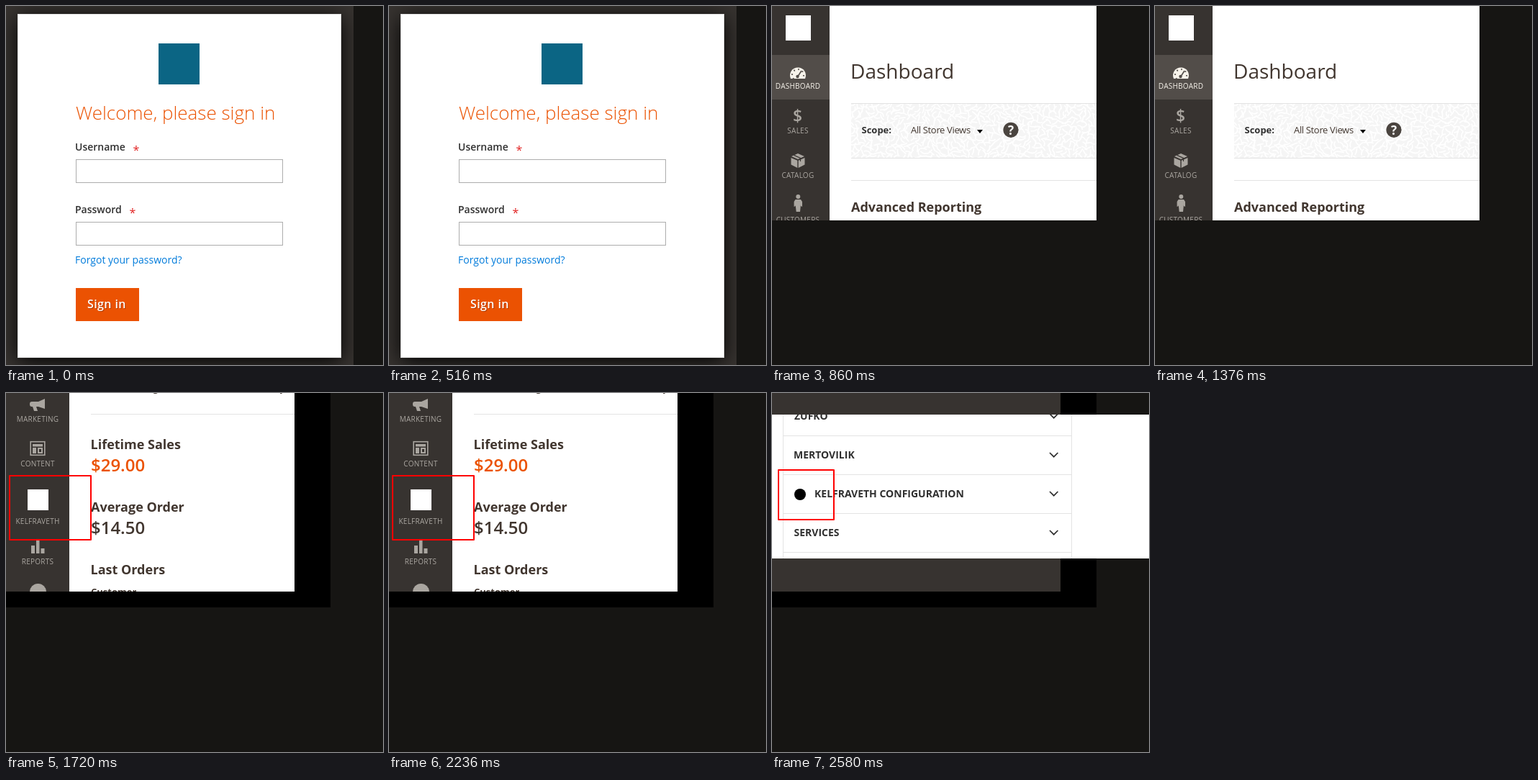
Write an HTML page that moves like this. It is 524 px wide and 499 px high and loops after 3.44 s.

```html
<!DOCTYPE html>
<html lang="en">
<head>
<meta charset="utf-8">
<title>Store admin tour</title>
<style>
  html, body { margin: 0; width: 100%; height: 100%; overflow: hidden; background: #161513; }
  svg { display: block; width: 524px; height: 499px; font-family: "Open Sans", sans-serif; }
  .scene { opacity: 0; animation: show 3440ms step-end infinite; }
  @keyframes show {
    0% { opacity: 1; }
    25%, 100% { opacity: 0; }
  }
  .b { font-weight: 700; }
  .sb { font-weight: 600; }
  .menu { font-size: 10px; letter-spacing: .025em; text-anchor: middle; fill: #aaa6a0; }
  .icon { fill: #aaa6a0; }
  .rule { fill: #e3e3e3; }
  .mark { fill: none; stroke: #f00; stroke-width: 2; stroke-linejoin: round; }
  .input { fill: #fff; stroke: #adadad; }
  .star { font-size: 16px; fill: #e22626; }
  .arrow { fill: none; stroke: #303030; stroke-width: 1.7; }
</style>
</head>
<body>
<svg viewBox="0 0 524 499">
  <defs>
    <clipPath id="c0"><rect width="483" height="499"/></clipPath>
    <clipPath id="c1"><rect width="451" height="298"/></clipPath>
    <clipPath id="c2"><rect width="401" height="276"/></clipPath>
    <clipPath id="c3"><rect y="30" width="524" height="200"/></clipPath>
    <clipPath id="band"><rect x="110" y="136" width="341" height="75"/></clipPath>
    <filter id="shadow" x="-20%" y="-20%" width="140%" height="140%">
      <feDropShadow dx="0" dy="5" stdDeviation="15" flood-color="#000"/>
    </filter>
  </defs>
  <rect width="524" height="499" fill="#161513"/>

  <!-- Sign in -->
  <g class="scene" clip-path="url(#c0)">
    <rect width="483" height="499" fill="#373330"/>
    <rect x="16" y="11" width="450" height="478" fill="#fff" filter="url(#shadow)"/>
    <rect x="16.5" y="11.5" width="449" height="477" fill="#fff" stroke="#e3e3e3"/>
    <rect x="212" y="52" width="57" height="57" fill="#0b6584"/>
    <text x="97" y="158" font-size="26" font-weight="300" fill="#eb5202">Welcome, please sign in</text>
    <g class="sb" font-size="14" fill="#303030">
      <text x="96" y="201">Username</text>
      <text x="96" y="288">Password</text>
    </g>
    <text class="star" x="176.5" y="206">*</text>
    <text class="star" x="171.5" y="293">*</text>
    <rect class="input" x="97.5" y="213.5" width="287" height="32"/>
    <rect class="input" x="97.5" y="300.5" width="287" height="32"/>
    <text x="96" y="358" font-size="14" fill="#007bdb">Forgot your password?</text>
    <rect x="97" y="392" width="88" height="46" fill="#eb5202"/>
    <text class="sb" x="113" y="420" font-size="16" letter-spacing=".4" fill="#fff" style="text-shadow:1px 1px 0 rgba(0,0,0,.25)">Sign in</text>
  </g>

  <!-- Dashboard -->
  <g class="scene" clip-path="url(#c1)">
    <rect width="451" height="298" fill="#fff"/>
    <rect width="80" height="298" fill="#373330"/>
    <rect y="68" width="80" height="62" fill="#524d49"/>
    <rect x="19" y="13" width="35" height="35" fill="#fff"/>

    <path d="M26 101A11 11 0 1 1 46 101Z" fill="#f7f3eb"/>
    <g stroke="#524d49" fill="none">
      <circle cx="36" cy="96" r="8" stroke-width="2" stroke-dasharray="1.6 4.68"/>
      <path d="M35.5 98.5L41 90" stroke-width="1.6"/>
    </g>
    <circle cx="35.5" cy="98" r="2.2" fill="#524d49"/>
    <text class="icon sb" x="35.5" y="161" font-size="23" text-anchor="middle">$</text>
    <g class="icon">
      <path d="M36 205L45 209L36 213L27 209Z"/>
      <path d="M26.5 211L35.3 214.8V225L26.5 220.5Z"/>
      <path d="M45.5 211L36.7 214.8V225L45.5 220.5Z"/>
      <circle cx="36.3" cy="265" r="3"/>
      <path d="M32.5 269H40L42 272V279L40 278V276L39 286H33.7L32.6 276V278L30.6 279V272Z"/>
    </g>
    <path d="M30.5 207.4L39.5 211.4V216" fill="none" stroke="#373330" stroke-width="1.2"/>
    <g class="menu">
      <text x="36" y="115" style="fill:#f7f3eb">DASHBOARD</text>
      <text x="36" y="177">SALES</text>
      <text x="36" y="239">CATALOG</text>
      <text x="36" y="301">CUSTOMERS</text>
    </g>

    <text x="110" y="101" font-size="28" fill="#41362f" dx="-1">Dashboard</text>
    <rect x="110" y="135" width="341" height="77" fill="#f5f5f5"/>
    <path id="noise" clip-path="url(#band)" fill="none" stroke="#fff" stroke-width="1.7" stroke-linecap="round"/>
    <rect class="rule" x="110" y="135" width="341" height="1"/>
    <rect class="rule" x="110" y="211" width="341" height="1"/>
    <rect class="rule" x="110" y="242" width="341" height="1"/>
    <text class="b" x="124.5" y="177" font-size="13" fill="#303030">Scope:</text>
    <text x="193" y="177" font-size="13" letter-spacing="-.34" fill="#41362f">All Store Views</text>
    <path d="M285 172H293L289 177Z"/>
    <circle cx="332" cy="172.3" r="10.6" fill="#4a443f"/>
    <text class="b" x="332" y="178.5" font-size="17" text-anchor="middle" fill="#fff">?</text>
    <text class="b" x="110" y="286" font-size="18" fill="#41362f">Advanced Reporting</text>
  </g>

  <!-- Sales figures -->
  <g class="scene">
    <rect width="451" height="298"/>
    <g clip-path="url(#c2)">
      <rect width="401" height="276" fill="#fff"/>
      <rect width="88" height="276" fill="#373330"/>
      <g class="icon">
        <path d="M54 8V22L45 19H36Q33 19 33 16V15Q33 12 36 12H45Z"/>
        <path d="M37 19H42L44 25H39Z"/>
        <path d="M35 212H40V223H35ZM42 205H46.5V223H42ZM48.5 216H53.5V223H48.5Z"/>
        <circle cx="44.5" cy="276.5" r="11.5"/>
        <path d="M37 71H51V74.5H37ZM37 76H42V84H37ZM44 76H51V84H44Z"/>
      </g>
      <rect x="34.2" y="67.7" width="19.6" height="18.6" fill="none" stroke="#aaa6a0" stroke-width="1.6"/>
      <rect x="46" y="78" width="3" height="4" fill="#373330"/>
      <rect x="30" y="134" width="29" height="29" fill="#fff"/>
      <g class="menu">
        <text x="44" y="40">MARKETING</text>
        <text x="44" y="102">CONTENT</text>
        <text x="44" y="182">KELFRAVETH</text>
        <text x="44" y="238">REPORTS</text>
      </g>
      <g font-size="14" fill="#41362f">
        <text x="204" y="-3">g</text>
        <text x="381" y="-3">y</text>
      </g>
      <rect class="rule" x="118" y="29" width="283" height="1"/>
      <g class="b" font-size="18" fill="#41362f">
        <text x="117.5" y="78">Lifetime Sales</text>
        <text x="118" y="165">Average Order</text>
        <text x="117.5" y="252">Last Orders</text>
        <text x="118" y="281" font-size="13">Customer</text>
      </g>
      <g class="sb" font-size="24">
        <text x="118" y="109" fill="#eb5202">$29.00</text>
        <text x="118" y="196" fill="#41362f">$14.50</text>
      </g>
      <rect class="mark" x="5" y="115" width="113" height="89"/>
    </g>
  </g>

  <!-- Configuration list -->
  <g class="scene">
    <rect width="451" height="298"/>
    <rect width="401" height="276" fill="#373330"/>
    <g clip-path="url(#c3)">
      <rect y="30" width="524" height="200" fill="#fff"/>
      <rect class="rule" x="15" y="30" width="1" height="200"/>
      <rect class="rule" x="416" y="30" width="1" height="200"/>
      <g id="rows" class="b" font-size="14" fill="#303030"></g>
      <circle cx="39" cy="141" r="8"/>
      <rect class="mark" x="9" y="107" width="77" height="69"/>
    </g>
  </g>
</svg>
<script>
  const STEP = 860;
  const scenes = document.querySelectorAll('.scene');
  scenes.forEach((el, i) => {
    el.style.animationDelay = `${-((scenes.length - i) % scenes.length) * STEP}ms`;
  });

  // Accordion rows: label and left edge
  const rows = [['ZUFKO', 31], ['MERTOVILIK', 30], ['KELFRAVETH CONFIGURATION', 59], ['SERVICES', 30.5]];
  document.getElementById('rows').innerHTML = rows.map(([label, x], i) => {
    const y = 32 + i * 54;
    return `<text x="${x}" y="${y + 5}">${label}</text>
      <path class="arrow" d="M386 ${y - 3}l5.7 5.7 5.7 -5.7"/>
      <rect class="rule" x="15" y="${y + 27}" width="402" height="1"/>`;
  }).join('');

  // Squiggle texture of the scope bar
  let seed = 7;
  const rnd = () => (seed = seed * 16807 % 2147483647) / 2147483647;
  let d = '';
  for (let y = 136; y < 214; y += 6) {
    for (let x = 110; x < 454; x += 7) {
      const a = rnd() * Math.PI * 2, bend = (rnd() - .5) * 8;
      const c = Math.cos(a) * 4, s = Math.sin(a) * 4;
      const px = x + rnd() * 4, py = y + rnd() * 3;
      d += `M${(px - c).toFixed(1)} ${(py - s).toFixed(1)}q${(c - s * bend / 4).toFixed(1)} ${(s + c * bend / 4).toFixed(1)} ${(2 * c).toFixed(1)} ${(2 * s).toFixed(1)}`;
    }
  }
  document.getElementById('noise').setAttribute('d', d);
</script>
</body>
</html>
```
